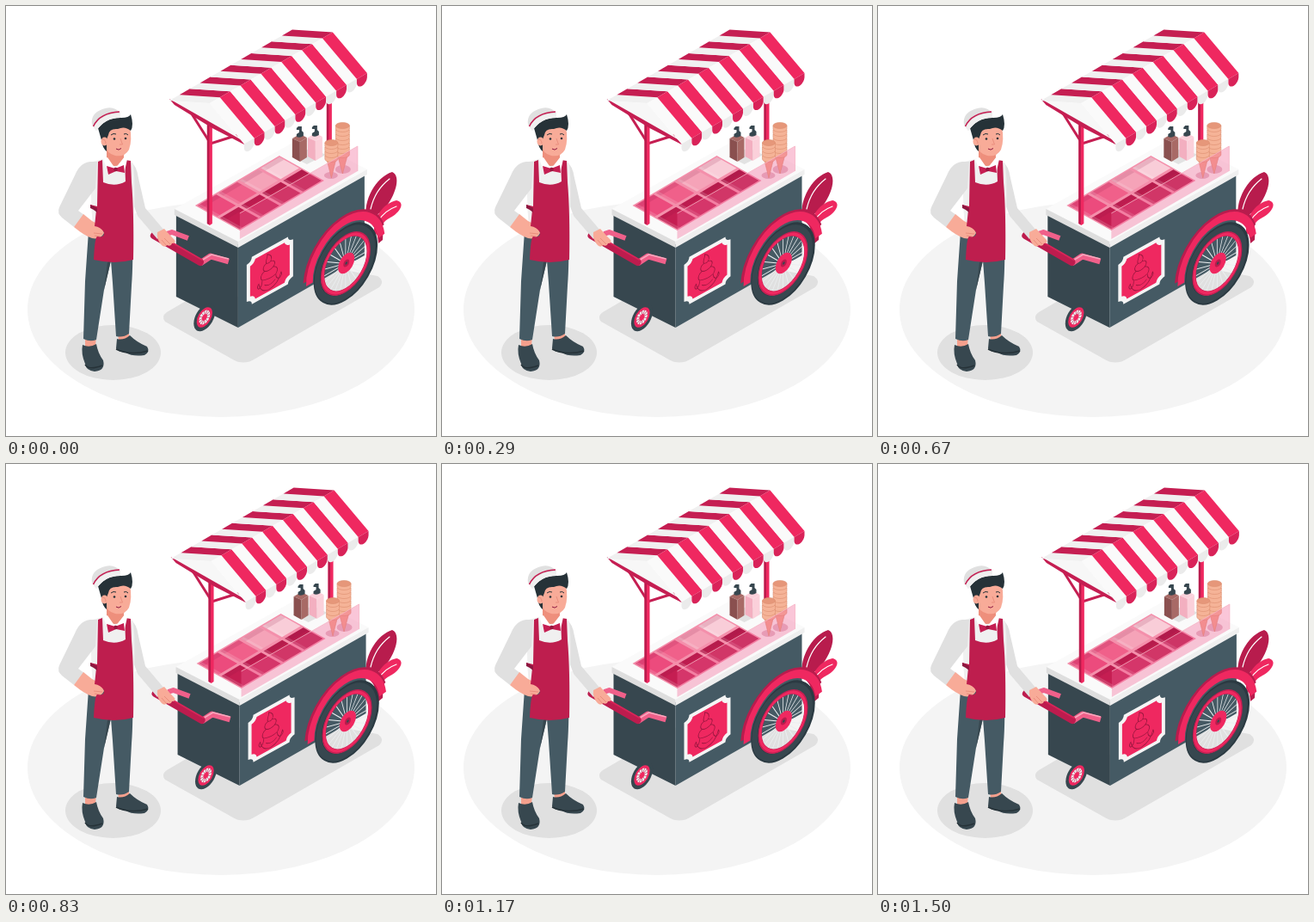
Animation of 500 by 500 pixels, one loop 1540 ms. Source, as an HTML page:

```html
<!DOCTYPE html>
<html lang="en">
<head>
<meta charset="utf-8">
<title>Ice cream cart</title>
<style>
  html, body { margin: 0; width: 100%; height: 100%; overflow: hidden; background: #fff; }
  svg { display: block; width: 100vw; height: 100vh; }
</style>
</head>
<body>
<svg viewBox="0 0 500 500">
  <ellipse cx="250" cy="353" rx="225" ry="125" fill="#f4f4f4"/>
  <ellipse cx="124.500" cy="403" rx="55.500" ry="32" fill="#e0e0e0"/>
  <path d="M185 367Q180 361 187 356L300 290 432 314Q441 320 434 327L290 410Q276 419 262 410Z" fill="#e0e0e0"/>

  <g id="feathers" stroke-linecap="round">
    <path d="M419 248C415 226 430 199 449 193C459 197 454 217 443 232C436 241 428 243 425 252Z" fill="#b81c4d"/>
    <path d="M424 236Q429 214 446 201" fill="none" stroke="#fff" stroke-width="1.200"/>
    <path d="M428 264C427 244 440 229 454 226C463 228 460 236 453 242C445 249 436 247 435 268Z" fill="#ef2860"/>
    <path d="M433 250Q440 238 454 233" fill="none" stroke="#fff" stroke-width="1.200"/>
    <path d="M417 246Q421 240 429 239Q440 247 438 272L433 276Q432 256 417 246Z" fill="#b81c4d"/>
  </g>

  <g id="cart">
    <path d="M198 239L270 277V374L198 338Z" fill="#37474f"/>
    <path d="M270 277L417 194V290L270 374Z" fill="#455a64"/>
    <g transform="matrix(.866 -.5 0 1 231 362)">
      <circle r="14.500" fill="#37474f"/><circle r="10.500" fill="#ef2860"/><circle r="7.500" fill="#f0f0f0"/>
      <g id="smallSpokes" stroke="#b81c4d" stroke-width=".6"></g>
      <circle r="3.500" fill="#ef2860"/>
    </g>
    <path d="M196 236L270 274 420 190 346 152Z" fill="#fafafa"/>
    <path d="M196 236L270 274V281L196 243Z" fill="#dedede"/>
    <path d="M270 274L420 190V196L270 281Z" fill="#efefef"/>

    <path d="M373 112h6v54l-3 2-3-2Z" fill="#ef2860"/><path d="M373 112h2.500v55l-2.500-1Z" fill="#b81c4d"/>

    <g id="tray" transform="matrix(98 -58 52 29 220 232)"></g>

    <path d="M332 175L350 184 372 173 355 165Z" fill="#e2e2e2"/>
    <g id="bottles"></g>

    <g fill="#c97f97" opacity=".5"><ellipse cx="378" cy="197" rx="8" ry="4"/><ellipse cx="392" cy="190" rx="9" ry="5"/></g>
    <g id="cones" stroke="#dc8d70" stroke-width=".6"></g>
    <path d="M272 241L409 163V192L272 271Z" fill="#f06292" opacity=".36"/>
    <path d="M272 241L409 163V192" fill="none" stroke="#f6b4c6" stroke-width=".8"/>

    <path d="M212 119L238 160 276 148" fill="none" stroke="#c51e52" stroke-width="3"/>
    <path d="M234 130h6V253l-3 2-3-2Z" fill="#ef2860"/><path d="M234 132h2.500V254l-2.500-1Z" fill="#b81c4d"/>

    <g id="awning">
      <path d="M190 110L237 113 277 161Z" fill="#f7f7f7"/>
      <path d="M190 108L277 157.500V161L240 142 196 115Z" fill="#c51e52"/>
    </g>

    <g transform="matrix(1 -.55 0 1 280 295)">
      <path d="M6 0H48Q48 5 54 6V49Q48 50 48 55H6Q6 50 0 49V6Q6 5 6 0Z" fill="#f5f5f5"/>
      <path d="M10 4.500H44Q45 9 50 10V45Q45 46 44 51H10Q9 46 4 45V10Q9 9 10 4.500Z" fill="#ef2860"/>
      <g fill="none" stroke="#98173f" stroke-width=".8" stroke-linejoin="round" stroke-linecap="round">
        <path d="M24 7C29 10 30 13 28 17C33 18 34 22 31 25C36 27 37 31 34 35Q27 38 18 34C15 30 17 26 21 25C18 22 19 18 23 17C21 13 25 11 24 7Z"/>
        <path d="M23 17Q26 19 28 17M21 25Q26 28 31 25"/>
        <path d="M14 36Q16 48 26 49Q37 48 40 36M14 36Q11 39 14 42Q18 41 18 35M40 36Q42 40 38 42Q34 41 34 36M21 41Q27 46 33 41"/>
      </g>
    </g>

    <g transform="matrix(.866 -.5 0 1 395 299.500)" fill="none">
      <path d="M-52 -5A51 51 0 0 1 47 -18" stroke="#b81c4d" stroke-width="10"/>
      <path d="M-48.500 0A48.500 48.500 0 0 1 48 -8" stroke="#ef2860" stroke-width="9"/>
      <circle r="38" stroke="#2b3a42" stroke-width="10"/>
      <circle cx="-1" r="37" stroke="#37474f" stroke-width="7.500"/>
      <g id="spokes" stroke="#eceff1" stroke-width=".9"></g>
      <circle r="31" stroke="#c51e52" stroke-width="5"/>
      <circle r="30.500" stroke="#ef2860" stroke-width="3"/>
      <circle cx="1" r="11" fill="#ef2860"/><circle cx="1" r="4" fill="#b81c4d"/><circle cx="1" r="1.500" fill="#37474f"/>
    </g>

    <g fill="none" stroke-linejoin="round">
      <path d="M187 265L193 263 212 270" stroke="#f0608a" stroke-width="6"/>
      <path d="M226 299L238 291 259 297" stroke="#f0608a" stroke-width="7"/>
      <path d="M229 295L239 289 259 294" stroke="#f9a9be" stroke-width="1.500"/>
      <path d="M172 267L226 298" stroke="#bd1c4e" stroke-width="8" stroke-linecap="round"/>
      <path d="M174 264L228 295" stroke="#d92559" stroke-width="2" stroke-linecap="round"/>
    </g>
  </g>

  <g id="man">
    <path d="M92 383L105 383 104 396 92 396ZM130 378L142 376 144 387 131 390Z" fill="#f5a08d"/>
    <path d="M89 394Q97 398 105 393Q107 404 113 412Q116 424 103 425Q93 424 92 416Q87 404 89 394Z" fill="#37474f"/>
    <path d="M129 387Q137 389 144 383Q152 391 164 396Q168 402 161 406Q147 408 139 403Q129 402 128 398Z" fill="#37474f"/>
    <path d="M92 417Q96 424 112 418M128 399Q145 407 165 401" fill="none" stroke="#263238" stroke-width="1.500"/>
    <path d="M96 262L147 255Q148 300 146 325L143 381Q136 386 128 384L124 322 122 296 114 330 105 388Q98 391 90 387L92 320Z" fill="#455a64"/>
    <path d="M122 296L114 330 118 298Z" fill="#37474f"/>

    <path d="M144 181Q152 185 154 200L162 235 185 262 176 271 153 244 146 225Z" fill="#e0e0e0"/>
    <path d="M176 263L184 259Q190 266 196 272Q198 276 193 276Q192 280 187 278Q184 282 180 277Q175 271 176 263Z" fill="#f8ab98"/>
    <path d="M184 270L191 277M181 272L187 279" stroke="#e58776" stroke-width=".8"/>

    <path d="M101 181L116 177 137 177 148 183Q151 215 148 258H101Q97 215 101 181Z" fill="#f0f0f0"/>
    <path d="M98 181Q86 182 80 197L62 234Q59 241 65 246L79 257 91 243 84 238 104 212 106 181Z" fill="#e0e0e0"/>
    <path d="M90 242L100 250Q112 255 114 264Q110 272 100 270Q91 267 79 257Z" fill="#f8ab98"/>
    <path d="M102 264L112 265M103 267L109 268" stroke="#e58776" stroke-width=".8"/>

    <path d="M107 181L112 179 113 205Q127 211 139 204L138 179 145 180 146 205Q149 240 148 295Q126 301 102 295Q103 270 106 268Q115 270 114 263Q110 257 103 256L105 237 98 234V231L106 233Z" fill="#be1e4e"/>
    <path d="M98 231L106 235V240Q101 236 98 235Z" fill="#8d1740"/>

    <path d="M117 164H137V180Q128 191 117 182Z" fill="#ee8f7c"/>
    <path d="M113 178L118 176 127 189 119 194ZM138 175L141 178 138 192 127 189Z" fill="#fff"/>
    <path d="M117 186L127 189 137 185 138 194 128 192 119 196Z" fill="#c51e52"/>
    <circle cx="127.500" cy="190" r="2.300" fill="#98173f"/>

    <path d="M116 143Q130 134 144 141Q147 155 143 167Q138 176 127 174Q117 172 115 160Z" fill="#f8ab98"/>
    <path d="M107 142Q120 127 134 130Q143 130 145 126Q149 139 145 145Q138 139 130 143Q120 142 119 150L117 155 117 169Q112 165 111 156Z" fill="#263238"/>
    <ellipse cx="114.500" cy="157.500" rx="4" ry="5" fill="#f8ab98"/>
    <path d="M112 155Q116 155 116 160" fill="none" stroke="#e58776" stroke-width=".8"/>
    <g fill="#263238"><circle cx="126" cy="154.500" r="1.300"/><circle cx="139" cy="154" r="1.300"/></g>
    <path d="M122 150Q125 147.500 128 149M137 149Q140 147.500 142 150" fill="none" stroke="#263238"/>
    <path d="M133 154L135.500 161 132 161" fill="none" stroke="#e58776" stroke-width=".8"/>
    <path d="M128 166Q131 168.500 134 165.500" fill="none" stroke="#8d1740"/>

    <path d="M100 138Q98 125 112 120Q126 115 133 125V130Q115 130 105 145Z" fill="#e0e0e0"/>
    <path d="M102 141Q110 125 133 125V130Q115 130 105 145Z" fill="#f0f0f0"/>
    <path d="M101.500 140Q109 124 132 123" fill="none" stroke="#c51e52" stroke-width="1.600"/>
  </g>
</svg>
<script>
const $ = id => document.getElementById(id);
const add = (id, markup) => $(id).insertAdjacentHTML('beforeend', markup);
const poly = (pts, fill) => `<path d="M${pts.join('L')}Z" fill="${fill}"/>`;

// Striped awning: two slopes and a scalloped edge
const STRIPES = 12, RUN = [143, -82.500];
const along = ([x, y], i) => [x + RUN[0] * i / STRIPES, y + RUN[1] * i / STRIPES];
const back = [190, 110], ridge = [237, 113], eave = [277, 160.500];
let scallops = '';
for (let i = 0; i < STRIPES; i++) {
  const red = i % 2;
  const strip = (a, b, fill) => poly([along(a, i), along(a, i + 1), along(b, i + 1), along(b, i)], fill);
  add('awning', strip(back, ridge, red ? '#c51e52' : '#f0f0f0') + strip(ridge, eave, red ? '#ef2860' : '#fafafa'));
  const [x, y] = along(eave, i);
  scallops += `<path d="M${x} ${y}v5c1 8 11 2 11.900-7v-4.900Z" fill="${red ? '#d92359' : '#ebebeb'}"/>`;
}
add('awning', scallops);

// Ice cream tubs, in unit coordinates of the tray
const box = (x, y, w, h, fill) => `<rect x="${x}" y="${y}" width="${w}" height="${h}" fill="${fill}"/>`;
const tubs = [
  ['#ec4b7d', '#f0608a', '#f5a3b8', '#f9cdd8'],
  ['#c51e52', '#c51e52', '#be1e4e', '#b81c4d']
];
add('tray', box(0, 0, 1, 1, '#f48fab'));
tubs.forEach((row, r) => row.forEach((fill, c) => {
  const x = c / 4 + .015, y = r / 2 + .03;
  add('tray', box(x, y, .22, .44, fill) +
    `<g fill-opacity=".15">${box(x, y, .22, .1, '#8d1740')}${box(x, y, .03, .44, '#fff')}</g>`);
}));

// Sauce bottles
[[333, 151, '#a86a66', '#8a504f'], [351, 150, '#fbd0da', '#f3afc0']].forEach(([x, y, light, dark]) => add('bottles',
  poly([[x, y + 3], [x + 9, y - 2], [x + 17, y + 2], [x + 9, y + 7]], light) +
  poly([[x, y + 3], [x + 9, y + 7], [x + 9, y + 30], [x, y + 25]], dark) +
  poly([[x + 9, y + 7], [x + 17, y + 2], [x + 17, y + 25], [x + 9, y + 30]], light) +
  `<path d="M${x + 5} ${y + 1}v-3l3-2v-3h-3v-2l2-2h4v5l2 2v4q-4 3-8 1Z" fill="#37474f"/>`));

// Stacked cones
const stack = (x, top, n, tip, r) => {
  const base = top + n * 5;
  let s = `<path d="M${x - r + 1} ${base}L${x} ${tip}L${x + r - 1} ${base}Z" fill="#f3a58c"/>`;
  for (let i = n; i >= 0; i--) {
    const y = top + i * 5;
    s += `<path d="M${x - r} ${y}v4a${r} 3.500 0 0 0 ${2 * r} 0v-4Z" fill="#f5b397"/>`;
  }
  return s + `<ellipse cx="${x}" cy="${top}" rx="${r}" ry="3.500" fill="#e6977a"/>`;
};
add('cones', stack(391.500, 139, 6, 195, 8) + stack(378.500, 159, 3, 200, 7.500));

// Wheels
const spokes = (id, n, r) => {
  for (let i = 0; i < n; i++) add(id, `<path d="M0 0V${-r}" transform="rotate(${i * 360 / n})"/>`);
};
spokes('spokes', 24, 29);
spokes('smallSpokes', 12, 8);

// The cart shakes sideways, drawn at 24 pictures a second
const LOOP = 1540, FPS = 24, SHAKE = 36;
const shifts = [0, -1, 2, -4, 4, -4, 4, -4, 2, -1, 0];
const cart = $('cart');
function draw(now) {
  const step = Math.floor((now % LOOP + 4) * FPS / 1000);
  const p = (step + .5) / SHAKE % 1 * (shifts.length - 1);
  const i = Math.floor(p);
  const x = shifts[i] + (shifts[i + 1] - shifts[i]) * (p - i);
  cart.setAttribute('transform', `translate(${x.toFixed(3)} 0)`);
  requestAnimationFrame(draw);
}
draw(0);
</script>
</body>
</html>
```
